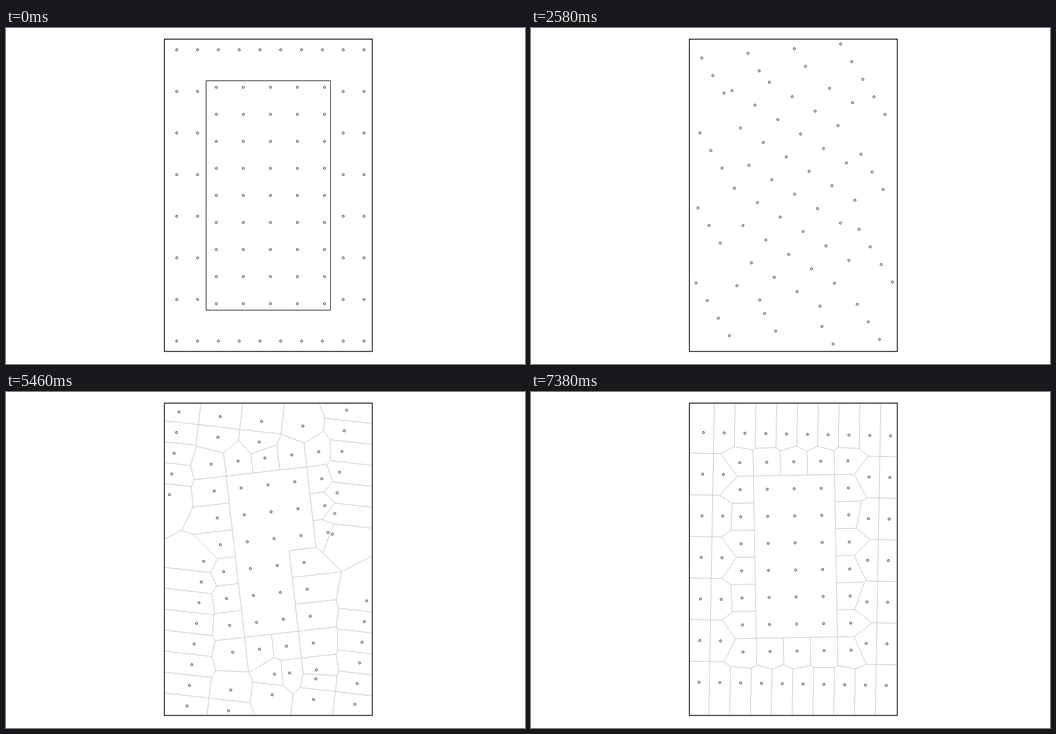
Recreate the animation shown at these times as an HTML page with a canvas. Size 930 px wide and 602 px high, loop 7.44 s.

```html
<!DOCTYPE html>
<html lang="en">
<head>
<meta charset="utf-8">
<title>Rotating grids</title>
<style>
  html, body { margin: 0; width: 100%; height: 100%; overflow: hidden; background: #fff; }
  canvas { display: block; }
</style>
</head>
<body>
<canvas id="stage" width="930" height="602"></canvas>
<script>
const ctx = document.getElementById('stage').getContext('2d');
const LOOP = 7440, STEP = 60, UNIT = 37.28;
const TRIANGLE_FROM = 1240, PLAIN_FROM = 2480, CELLS_FROM = 4960;
const MID = { x: 470, y: 300 };
const FIELD = { x: MID.x - 5 * UNIT, y: MID.y - 7.5 * UNIT, w: 10 * UNIT, h: 15 * UNIT };
const MARGIN = 0.2 * UNIT;

// step, turn in degrees, outer grid offset (u, v), inner grid offset (u, v)
const KEYS = [
  [0, 0, 0.6, 1, 0.1, 0],
  [28, 80.65, 0.574, 0.85, 0.375, -0.407],
  [43, 122.26, 0.938, 1.806, -0.087, -0.024],
  [65, 185.95, 1.246, 0.928, -0.059, 0.08],
  [91, 263.47, 1.443, 1.075, -0.339, 0.394],
  [107, 311.22, 1.268, 0.065, 0.154, -0.099],
  [123, 359, 1.573, -0.022, 0.105, 0.506]
];

const box = (x, y, w, h) => [[x, y], [x + w, y], [x + w, y + h], [x, y + h]];
const RECT = box(FIELD.x + 2 * UNIT, FIELD.y + 2 * UNIT, 6 * UNIT, 11 * UNIT);
const TRIANGLE = [[472, 167.5], [624, 430.9], [320, 430.9]];

function poseAt(step) {
  let k = 0;
  while (k < KEYS.length - 2 && step > KEYS[k + 1][0]) k++;
  const a = KEYS[k], b = KEYS[k + 1];
  const f = (step - a[0]) / (b[0] - a[0]);
  return a.map((v, i) => v + (b[i] - v) * f);
}

// Corners run clockwise on screen
function inside(shape, x, y) {
  return shape.every(([ax, ay], i) => {
    const [bx, by] = shape[(i + 1) % shape.length];
    return (bx - ax) * (y - ay) - (by - ay) * (x - ax) >= 0;
  });
}

function inField(x, y) {
  return x > FIELD.x + MARGIN && x < FIELD.x + FIELD.w - MARGIN &&
         y > FIELD.y + MARGIN && y < FIELD.y + FIELD.h - MARGIN;
}

function grid(deg, u0, v0, du, dv, keep) {
  const c = Math.cos(deg * Math.PI / 180), s = Math.sin(deg * Math.PI / 180);
  const out = [];
  for (let i = -14; i <= 14; i++) {
    for (let j = -12; j <= 12; j++) {
      const u = (u0 + i * du) * UNIT, v = (v0 + j * dv) * UNIT;
      const x = MID.x + c * u - s * v, y = MID.y + s * u + c * v;
      if (keep(x, y)) out.push({ x, y });
    }
  }
  return out;
}

// Keep the part of a cell nearer to p than to q; each corner remembers
// which neighbour lies across the edge that starts there
function clip(cell, p, q, id) {
  const nx = q.x - p.x, ny = q.y - p.y;
  const mx = (p.x + q.x) / 2, my = (p.y + q.y) / 2;
  const side = o => (o.x - mx) * nx + (o.y - my) * ny;
  const out = [];
  cell.forEach((a, i) => {
    const b = cell[(i + 1) % cell.length];
    const da = side(a), db = side(b);
    if (da <= 0) out.push(a);
    if ((da <= 0) !== (db <= 0)) {
      const f = da / (da - db);
      out.push({
        x: a.x + (b.x - a.x) * f,
        y: a.y + (b.y - a.y) * f,
        id: da <= 0 ? id : a.id
      });
    }
  });
  return out;
}

function cellEdges(points, i) {
  let cell = box(FIELD.x, FIELD.y, FIELD.w, FIELD.h).map(([x, y]) => ({ x, y, id: -1 }));
  points.forEach((q, j) => {
    if (j !== i) cell = clip(cell, points[i], q, j);
  });
  return cell
    .map((a, k) => ({ a, b: cell[(k + 1) % cell.length], id: a.id }))
    .filter(e => e.id >= 0 && Math.hypot(e.a.x - e.b.x, e.a.y - e.b.y) > 0.3);
}

// Cells of the inner grid show only where they touch the outer grid
function drawCells(outer, inner) {
  const points = outer.concat(inner);
  const cells = points.map((p, i) => cellEdges(points, i));
  const shown = cells.map((c, i) => i < outer.length || c.some(e => e.id < outer.length));
  ctx.beginPath();
  cells.forEach((edges, i) => {
    for (const e of edges) {
      if (e.id > i && (shown[i] || shown[e.id])) {
        ctx.moveTo(e.a.x, e.a.y);
        ctx.lineTo(e.b.x, e.b.y);
      }
    }
  });
  ctx.strokeStyle = '#c0c0c0';
  ctx.lineWidth = 1;
  ctx.stroke();
}

// Corners sit on pixel centres so that straight sides stay crisp
function outline(shape) {
  ctx.beginPath();
  shape.forEach(([x, y]) => ctx.lineTo(Math.floor(x) + 0.5, Math.floor(y) + 0.5));
  ctx.closePath();
  ctx.strokeStyle = '#000';
  ctx.lineWidth = 1;
  ctx.stroke();
}

function drawDots(points) {
  ctx.strokeStyle = '#000';
  ctx.lineWidth = 0.9;
  for (const p of points) {
    ctx.beginPath();
    ctx.arc(p.x, p.y, 1.95, 0, 2 * Math.PI);
    ctx.stroke();
  }
}

function draw(ms) {
  const step = Math.floor((ms % LOOP) / STEP), t = step * STEP;
  const [, turn, ou, ov, iu, iv] = poseAt(step);
  const shape = t >= TRIANGLE_FROM && t < PLAIN_FROM ? TRIANGLE : RECT;
  const outer = grid(-turn, ou, ov, 1, 2, (x, y) => inField(x, y) && !inside(shape, x, y));
  const inner = grid(turn, iu, iv, 1.3, 1.3, (x, y) => inside(shape, x, y));

  ctx.fillStyle = '#fff';
  ctx.fillRect(0, 0, 930, 602);
  if (t >= CELLS_FROM) drawCells(outer, inner);
  if (t < PLAIN_FROM) outline(shape);
  drawDots(outer);
  drawDots(inner);
  ctx.strokeStyle = '#000';
  ctx.lineWidth = 1.5;
  ctx.strokeRect(283.75, 20, 372.7, 559.5);
}

const start = performance.now();
function tick() {
  draw(performance.now() - start);
  requestAnimationFrame(tick);
}
tick();
</script>
</body>
</html>
```
